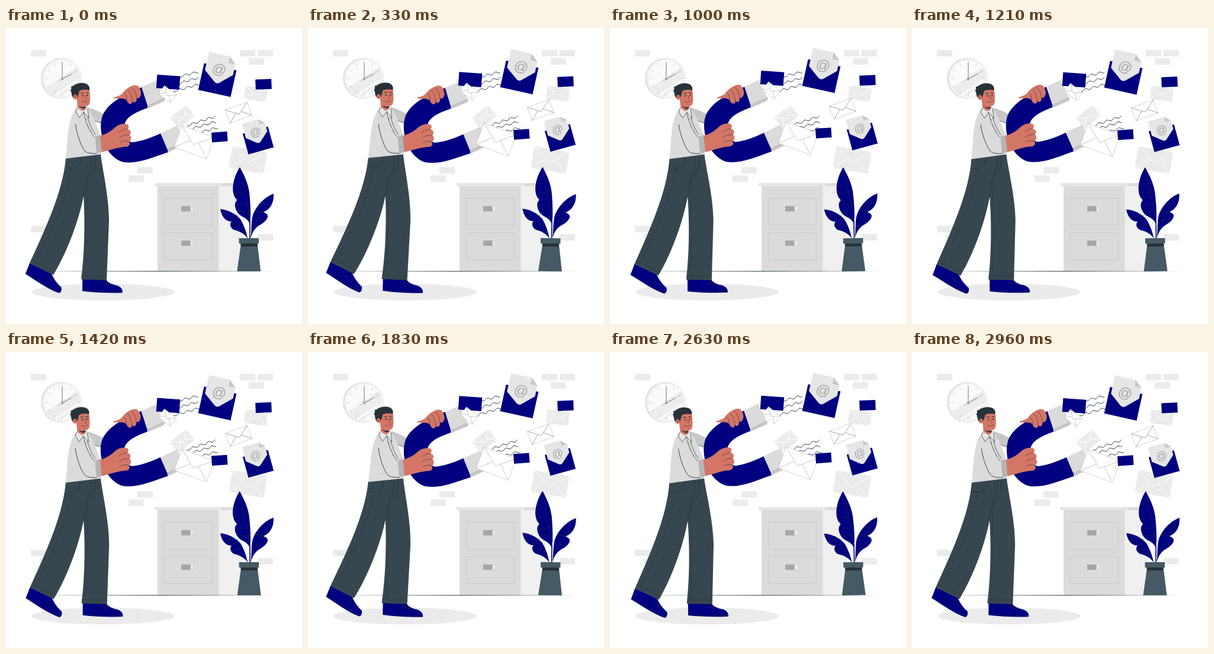
An HTML page with a canvas for the animation above (3000 ms loop, 500x500 px).

```html
<!DOCTYPE html>
<html lang="en">
<head>
<meta charset="utf-8">
<title>Mail magnet</title>
<style>
html, body { margin: 0; width: 100%; height: 100%; overflow: hidden; background: #fff; }
canvas { display: block; width: 100vw; height: 100vh; }
</style>
</head>
<body>
<canvas id="stage"></canvas>
<script>
const SIZE = 500, CYCLE = 1500, STEP = 1000 / 24;
const NAVY = '#000080', DARK = '#263238', CLOTH = '#37474f', SLATE = '#455a64';
const SKIN = '#d37666', PALE = '#ebebeb', LIGHT = '#dbdbdb', MID = '#c7c7c7', GREY = '#a6a6a6';

const canvas = document.getElementById('stage');
const ctx = canvas.getContext('2d');
const cache = new Map();

function shape(d) {
  if (!cache.has(d)) cache.set(d, new Path2D(d));
  return cache.get(d);
}
function fill(color, d) {
  ctx.fillStyle = color;
  ctx.fill(shape(d));
}
function line(color, width, d) {
  ctx.strokeStyle = color;
  ctx.lineWidth = width;
  ctx.stroke(shape(d));
}
function box(color, x, y, w, h) {
  ctx.fillStyle = color;
  ctx.fillRect(x, y, w, h);
}
function disc(color, x, y, rx, ry = rx) {
  ctx.fillStyle = color;
  ctx.beginPath();
  ctx.ellipse(x, y, rx, ry, 0, 0, 7);
  ctx.fill();
}
function at(x, y, deg, draw, scale = 1) {
  ctx.save();
  ctx.translate(x, y);
  ctx.rotate(deg * Math.PI / 180);
  ctx.scale(scale, scale);
  draw();
  ctx.restore();
}
function sway(x, y, deg, draw) {
  at(x, y, deg, () => { ctx.translate(-x, -y); draw(); });
}

function letter(x, y, w, h, deg, paper, edge, ink) {
  at(x, y, deg, () => {
    const a = w / 2, b = h / 2;
    box(paper, -a, -b, w, h);
    ctx.strokeStyle = edge;
    ctx.lineWidth = 0.7;
    ctx.strokeRect(-a, -b, w, h);
    line(ink, 0.9, `M${-a},${-b}L0,${h * 0.12}L${a},${-b}M${-a},${b}L${-w * 0.13},${-h * 0.02}M${a},${b}L${w * 0.13},${-h * 0.02}`);
  });
}
function card(x, y, w, h, deg) {
  at(x, y, deg, () => box(NAVY, -w / 2, -h / 2, w, h));
}
function openMail(x, y, deg, scale) {
  at(x, y, deg, () => {
    box(NAVY, -28, -23, 56, 46);
    fill('#e6e6e6', 'M-24,-43.7H12L24,-32.5V-14L4,4Q0,7 -4,4L-24,-12Z');
    fill(MID, 'M12,-43.7V-32.5H24Z');
    ctx.fillStyle = GREY;
    ctx.font = '24px "Liberation Sans", Arial, sans-serif';
    ctx.textAlign = 'center';
    ctx.textBaseline = 'alphabetic';
    ctx.fillText('@', -0.8, -10.5);
    line('#00005c', 0.5, 'M-28,23L-5,4M28,23L5,4');
  }, scale);
}
function wave(x0, y0, x1, y1) {
  const len = Math.hypot(x1 - x0, y1 - y0), turns = len / 14;
  at(x0, y0, Math.atan2(y1 - y0, x1 - x0) * 180 / Math.PI, () => {
    ctx.beginPath();
    for (let s = 0; s <= len; s++) ctx.lineTo(s, 1.7 * Math.sin(s / len * turns * 2 * Math.PI));
    ctx.strokeStyle = DARK;
    ctx.lineWidth = 0.9;
    ctx.stroke();
  });
}

function clock() {
  disc('#e0e0e0', 93.5, 85, 34.5);
  disc('#f0f0f0', 95, 85.3, 33.5);
  disc('#fafafa', 95, 85.3, 31);
  ctx.save();
  ctx.beginPath();
  ctx.arc(95, 85.3, 31, 0, 7);
  ctx.clip();
  fill('#ededed', 'M62,105L122,64L130,80L76,117ZM79,119L130,84V89L84,120Z');
  ctx.restore();
  for (let i = 0; i < 12; i++) {
    at(95, 85.3, i * 30, () => line(MID, 0.9, 'M0,-29V-25'));
  }
  line(GREY, 1.6, 'M95,86V59M95,86L110,78');
  line(GREY, 0.7, 'M88,90L119,73');
  disc(GREY, 95, 86, 2.2);
}

function drawer(y) {
  ctx.strokeStyle = MID;
  ctx.lineWidth = 0.8;
  ctx.strokeRect(267.5, y, 81, 45.5);
  box(GREY, 296, y + 13.3, 16, 9);
  box(PALE, 312, y + 13.3, 5, 9);
  ctx.strokeRect(312, y + 13.3, 5, 9);
}
function room() {
  const bricks = [[42, 37], [395, 37], [425, 37], [410, 51], [222, 235], [207, 249], [42, 334], [57, 348], [425, 348]];
  for (const [x, y] of bricks) box(PALE, x, y, 26, 11);
  clock();
  box('#f0f0f0', 359, 267, 42, 144);
  box(LIGHT, 256, 267, 103.5, 144);
  box('#e6e6e6', 251, 262, 114, 5);
  box(LIGHT, 365, 262, 40, 5);
  drawer(287.5);
  drawer(345.7);
  letter(422, 111, 37, 22, 8, PALE, PALE, '#fff');
  letter(298, 150, 34, 22.5, -38, PALE, PALE, '#fff');
  letter(409, 223, 59, 36.5, 9.5, PALE, PALE, '#fff');
  disc(PALE, 164, 446, 121, 14);
  fill(DARK, 'M39,411L250,410.4L461,411L250,411.6Z');
}

function plant() {
  line(NAVY, 1.6, 'M412,326V356');
  fill(NAVY, 'M395,235C387,247 380,268 385,282C386,287 390,289 390,291C384,296 387,308 394,315C400,320 408,321 412,331C414,318 413,298 411,278C409,262 402,248 395,235Z');
  fill(NAVY, 'M452,280C440,284 424,297 417,316C414,326 415,338 413.5,355C416,344 422,336 430,332C436,329 443,322 442,317C441,313 436,312 435,311C445,307 453,297 452,280Z');
  fill(NAVY, 'M362,306C364,317 370,327 381,327C377,331 379,338 385,341C394,343 402,347 408,355C406,344 402,333 396,323C387,313 375,307 362,306Z');
  line(DARK, 0.6, 'M396,242C401,270 409,300 412,328M399,262L388,267M402,278L388,279M406,297L391,300M408,309L394,310M403,275L409,272M407,296L412,292M449,286C436,302 420,327 414,352M440,298L431,296M432,310L422,309M423,326L435,323M431,312L442,303M366,309C382,319 399,336 408,354M379,317L372,320M388,325L391,316M394,332L383,335');
  box(SLATE, 393.5, 355, 33.5, 9);
  fill(SLATE, 'M397,364H424.5L430.3,411H390.3Z');
  fill(DARK, 'M396,364H425L424.5,369H397Z');
}

function legs() {
  fill(NAVY, 'M40,397L32.8,415.5C50,426 70,441 89,447.6C93,448 94.6,442 93.4,438C87,432 81,425 77,415Z');
  line(DARK, 0.6, 'M33.5,413.5C52,425 72,439 91,445M67,424L74,417M71,428L77,420M75,431L82,425');
  fill(NAVY, 'M129,424V444.5C150,447 175,448 196.6,447.2C197.5,442 195,438 188,435C178,433 172,430 169,425Z');
  line(DARK, 0.6, 'M129,442.5C152,445.5 176,446 197,445.3M160,431L171,428M164,433L175,430M169,435L179,432');
  fill(CLOTH, 'M101,220L160,213C163,240 174,285 174,325L170,426L127,424.5C132,385 134,335 131,284C124,322 104,378 80,417L40,397L60,353C78,312 97,265 101,220Z');
  line(DARK, 0.8, 'M104,236C122,239 125,231 126,219M144,216C145,230 144,240 139,248C135,256 133,270 131,286M151,215C152,232 150,243 143,249');
  line('#2c3940', 0.7, 'M42.5,391L83,411M127.8,418L170.4,419.5M110,238C104,280 88,318 52,392M138,254C135,278 138,345 134,419');
}
function shirt() {
  fill(MID, 'M134,133C143,135 154,139 166,146L163,162C154,160 146,156 140,151Z');
  line(DARK, 0.5, 'M141,150C147,156 154,159 161,160');
  fill(LIGHT, 'M120,135C112,141 107,158 104.5,182L101,220.5L160.5,213.5V183C155,172 149,146 137,136Z');
  fill(SKIN, 'M120,121L121,136C126,142 132,140 136,136L133,124Z');
  fill(DARK, 'M123,131C127,134 131,134 134.5,132.5L134,135.5C130,137 126,135 123,131Z');
  fill('#e6e6e6', 'M120,134L117.5,141L124,151.5L131,142ZM136,134L131,142L140,152L139,138Z');
  line(DARK, 0.7, 'M120,135L117.8,141.5L124,151.5L131,142L140,152L138,137M131,142C134,158 140,172 149,184M138,151C141,162 145,172 151,180');
  line(DARK, 0.9, 'M117.5,163C119,178 127,200 133,207.5C138,212.5 147,212 153,212');
  for (const [x, y] of [[134.5, 154], [138, 165], [142.5, 175]]) disc(DARK, x, y, 0.7);
}
function head() {
  fill(SKIN, 'M119,106C118,115 119,123 122,127.5C127,134 138,134.5 141,128C143,121 142,112 141,104L134,98Z');
  fill(DARK, 'M113.5,118C109.5,112 112,109 108.5,104.5C111,104.5 110.5,101 110,98.5C113,99 114,97 117,95.5C124,92 132,92 137,95C141,98 142,102 140.5,105C134,103 128,104 124,106C123,110 122,114 120.5,117Z');
  disc(SKIN, 116.8, 116.5, 3.3, 4);
  line(DARK, 0.6, 'M115,115C117,114 118,116 117.5,118M133.5,114C135.5,118 136.5,119 134,120M128,124C132,126 136,125 138.5,122');
  line(DARK, 1, 'M126.5,110.5C128,109 129.5,109 131,109.8M135,109.5C136.5,108.5 138,108.8 139.3,110');
  disc(DARK, 129.5, 114, 1, 1.5);
  disc(DARK, 137.2, 113.5, 1, 1.5);
}
function magnet() {
  fill(LIGHT, 'M229,100L253.5,89L267,118.5L239,132ZM261,178L290,164.5L300,193L272.5,206Z');
  fill(MID, 'M239,131.5L267,118.5L269,120L267,124L239,136ZM272,205L300,192L300,198L273,210.5Z');
  line(GREY, 0.6, 'M239,131.5L267,118.5M272,205.5L300,192.5');
  fill(NAVY, 'M229,100C205,111 174,123 163,148C154,174 167,216 196,226C220,231 246,219 273.5,210L272.5,205L261,178C244,186 226,192 213,193C199,190 196,171 202,158C208,147 223,141 239,135V131Z');
  line('#00005c', 0.6, 'M272.5,205C248,215 222,226 200,222C180,217 169,197 165,180');
}
function hands() {
  fill(SKIN, 'M181.5,117.5C188,115.5 194,114 197,110C202,103 210,98 217,96.5C224,96 226,101 228,108C229,115 224,121 220.5,118C222,125 216,128 213.5,123.5C214,130 206,130 204,122C199,117.5 191,119.5 183,119Z');
  line(DARK, 0.6, 'M204,121C204,115 202,112 199,110M213.5,124C213,116 210,108 206,105M220.5,118C220,110 217,104 213,101');
  fill('#b5b5b5', 'M150.5,183L160,181L163,209L153,212Z');
  fill(SKIN, 'M159,182C168,180 178,174 184,168C190,163 196,161 203,162C208,163 208.5,168 205,170.5C212,172 212,178.5 208.5,180.5C213,183 212,190 207.5,191.5C211,196 208,200 203,200.5C190,201 176,206.5 162,209.5Z');
  line(DARK, 0.6, 'M205,170.5C199,171 195,173 191,176M208.5,180.5C201,180 196,182 192,185M207.5,191.5C202,190 197,191 193,193');
}
function person() {
  legs();
  shirt();
  head();
  magnet();
  hands();
}

function mail(rise) {
  wave(293, 82, 325, 74);
  wave(290, 94, 325, 84);
  wave(283, 107, 326, 95);
  wave(306, 165, 354, 149);
  wave(311, 171, 355, 158);
  wave(326, 177, 358, 168);
  ctx.save();
  ctx.translate(0, -rise);
  card(274, 91.5, 39, 23, 4);
  card(435, 95, 27, 17, -2.5);
  letter(272.7, 112, 25.5, 17, 38, '#fff', MID, MID);
  letter(318, 193, 57.5, 38.5, 20, '#fff', MID, MID);
  letter(393, 143, 39, 23.5, -20, '#fff', MID, GREY);
  card(360.7, 184, 26.5, 16.5, -4);
  openMail(357, 88, 12.5, 1);
  openMail(426, 190, -15.5, 0.79);
  ctx.restore();
}

function frame(now) {
  const scale = window.devicePixelRatio || 1;
  const w = Math.round(innerWidth * scale), h = Math.round(innerHeight * scale);
  if (canvas.width !== w || canvas.height !== h) {
    canvas.width = w;
    canvas.height = h;
  }
  // 24 steps a second, one swing and one float per cycle
  const time = Math.floor((now + 5) / STEP) * STEP;
  const p = time % CYCLE / CYCLE;
  const angle = p < 0.25 ? 4 * p : p < 0.75 ? 2 - 4 * p : 4 * p - 4;
  const rise = 10 * (1 - Math.abs(1 - 2 * p));

  ctx.setTransform(w / SIZE, 0, 0, h / SIZE, 0, 0);
  ctx.lineCap = ctx.lineJoin = 'round';
  box('#fff', 0, 0, SIZE, SIZE);
  room();
  sway(166, 268, angle, person);
  mail(rise);
  sway(407, 323, angle, plant);
  requestAnimationFrame(frame);
}
requestAnimationFrame(frame);
</script>
</body>
</html>
```
